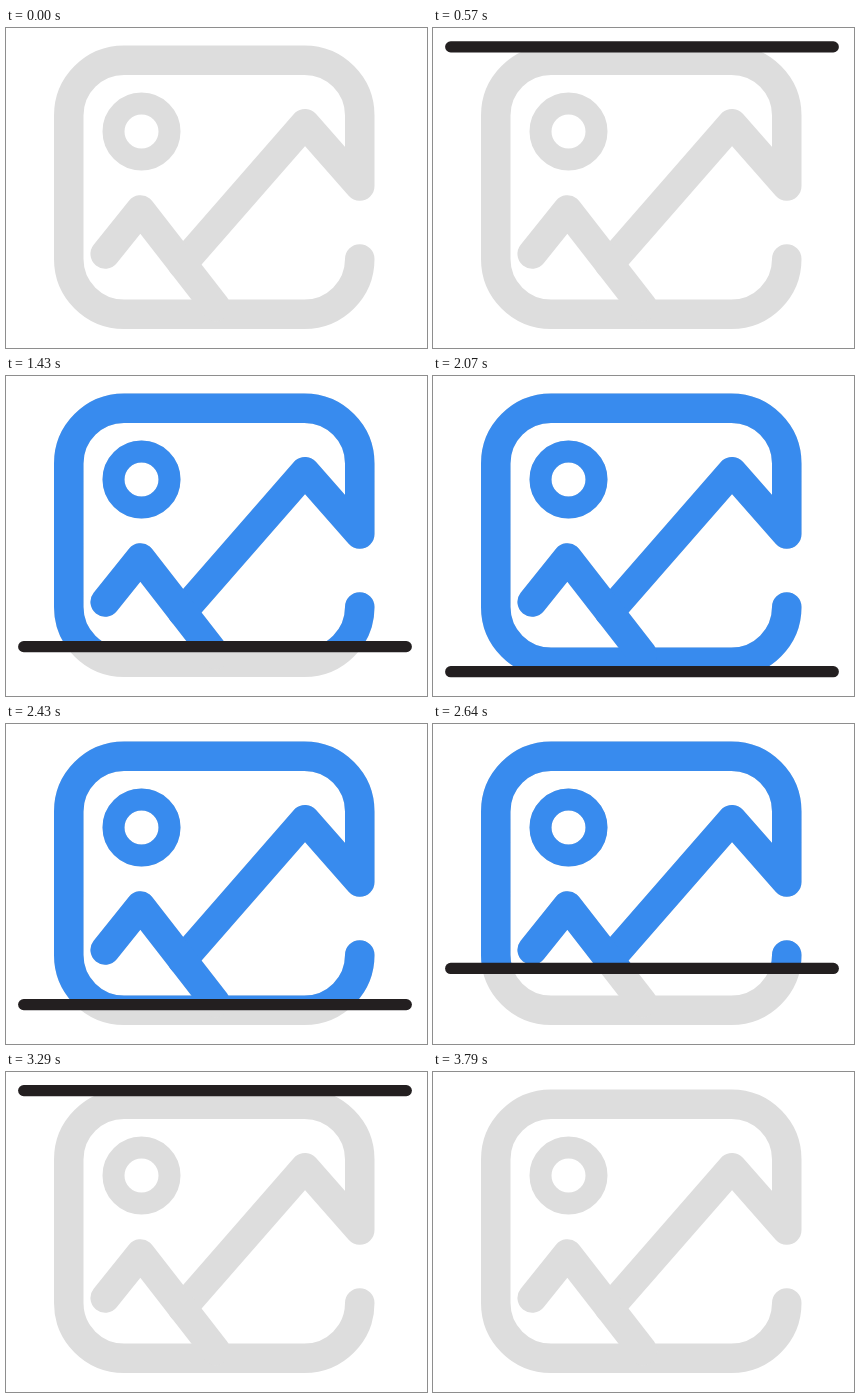
Write an HTML page that moves like this. It is 421 by 320 pixels and loops after 4.07 s.

```html
<!DOCTYPE html>
<html lang="en">
<head>
<meta charset="utf-8">
<title>Image scan</title>
<style>
  html, body { margin: 0; width: 100%; height: 100%; overflow: hidden; background: #fff; }
  svg { display: block; width: 421px; height: 320px; }
</style>
</head>
<body>
<svg viewBox="0 0 421 320" fill="none" stroke-linecap="round" stroke-linejoin="round">
  <defs>
    <g id="icon" stroke-width="29.5">
      <path d="M353.75 231A55.25 55.25 0 0 1 298.5 286.25H118A55.25 55.25 0 0 1 62.75 231V87.5A55.25 55.25 0 0 1 118 32.25H298.5A55.25 55.25 0 0 1 353.75 87.5V158L299 95.7L176.4 236.1"/>
      <path d="M99.2 226L134.5 182L209.5 278.5"/>
      <circle cx="135.5" cy="103.5" r="28" stroke-width="22"/>
    </g>
    <clipPath id="scanned"><rect id="reveal" width="421" height="0"/></clipPath>
  </defs>
  <use href="#icon" stroke="#ddd"/>
  <g clip-path="url(#scanned)"><use href="#icon" stroke="#388bee"/></g>
  <path id="bar" d="M17.7 0H400.3" stroke="#231f20" stroke-width="11.2" opacity="0"/>
</svg>
<script>
const LOOP = 4070, STEP = LOOP / 57;
const TOP = 18.6, BOTTOM = 296;
const bar = document.getElementById('bar');
const reveal = document.getElementById('reveal');

const progress = (t, start, end) => Math.min(1, Math.max(0, (t - start) / (end - start)));

// Cubic Bezier easing (1, 0, .26, 1), solved by bisection.
function ease(x) {
  let lo = 0, hi = 1;
  for (let i = 0; i < 30; i++) {
    const s = (lo + hi) / 2, r = 1 - s;
    if (3 * r * r * s + 3 * r * s * s * 0.26 + s ** 3 < x) lo = s; else hi = s;
  }
  return lo * lo * (3 - 2 * lo);
}

function draw(time) {
  // The motion advances in even steps; the small lead absorbs rounded times.
  const t = Math.floor((time % LOOP + 5) / STEP) % 57 * STEP;
  const down = ease(progress(t, 500, 1790));
  const up = ease(progress(t, 2000, 3290));
  const y = TOP + (BOTTOM - TOP) * (down - up);
  const opacity = progress(t, 0, 6 * STEP) - progress(t, 47 * STEP, 53 * STEP);
  bar.setAttribute('transform', `translate(0 ${y.toFixed(2)})`);
  bar.setAttribute('opacity', opacity.toFixed(3));
  reveal.setAttribute('height', (y - 1.6).toFixed(2));
}

const begin = performance.now();
function tick() {
  draw(performance.now() - begin);
  requestAnimationFrame(tick);
}
tick();
</script>
</body>
</html>
```
